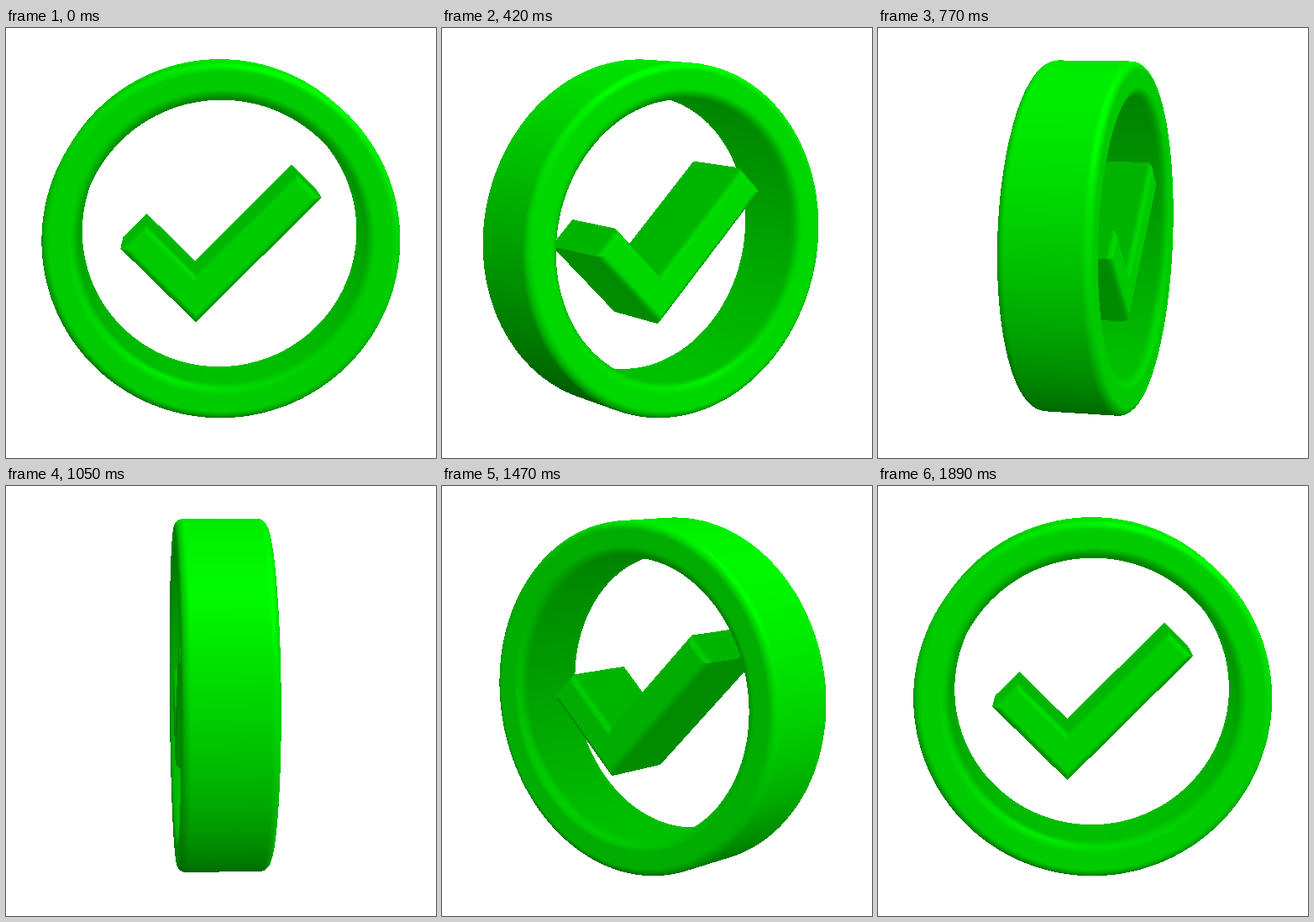
Recreate the animation shown at these times as an HTML page with a canvas. Size 512 by 512 pixels, loop 1960 ms.

```html
<!DOCTYPE html>
<html lang="en">
<head>
<meta charset="utf-8">
<title>Turning check badge</title>
<style>
html, body { margin: 0; width: 100%; height: 100%; overflow: hidden; background: #fff; }
canvas { display: block; width: 512px; height: 512px; }
</style>
</head>
<body>
<canvas id="stage" width="512" height="512"></canvas>
<script>
const SIZE = 512, STEP = 70, POSES = 28;
const CX = 255.3, CY = 249.2, DIST = 2200;
const PITCH = 8.2 * Math.PI / 180;
const ctx = document.getElementById('stage').getContext('2d');
const depth = new Float32Array(SIZE * SIZE);

// Yaw keys: pose, degrees, degrees per pose
const KEYS = [
  [0, 1.3, 0.5], [4, 17, 7.4], [8, 53, 9], [15, 93.5, 3.8],
  [19, 121.8, 9.7], [23, 161, 8.4], [27, 180.8, 0.6], [28, 181.3, 0.5]
];

function yawAt(p) {
  let i = 0;
  while (i < KEYS.length - 2 && p >= KEYS[i + 1][0]) i++;
  const [t0, a, ma] = KEYS[i], [t1, b, mb] = KEYS[i + 1];
  const w = t1 - t0, u = (p - t0) / w, v = 1 - u;
  const deg = a * (1 + 2 * u) * v * v + ma * w * u * v * v
            + b * u * u * (3 - 2 * u) - mb * w * u * u * v;
  // the badge reads the right way round on both half turns
  return (deg > 90 ? deg - 180 : deg) * Math.PI / 180;
}

const verts = [], tris = [];

function vert(pos, normal, inner) {
  verts.push({ pos, normal, inner });
  return verts.length - 1;
}

function quad(a, b, c, d) {
  tris.push([a, b, c], [a, c, d]);
}

function buildRing() {
  const R = 209.3, r = 166.3, half = 54, outB = 10, inB = 13, segs = 160, arc = 7;
  const corners = [[1, 1], [-1, 1], [-1, -1], [1, -1]];
  const profile = [];
  corners.forEach(([out, front], k) => {
    const bevel = out > 0 ? outB : inB;
    const rad = out > 0 ? R - bevel : r + bevel, z = front * (half - bevel);
    for (let i = 0; i <= arc; i++) {
      const f = (k + i / arc) * Math.PI / 2;
      const nr = Math.cos(f), nz = Math.sin(f);
      profile.push([rad + bevel * nr, z + bevel * nz, nr, nz, out < 0]);
    }
  });
  const n = profile.length, base = verts.length;
  for (let s = 0; s < segs; s++) {
    const a = s / segs * Math.PI * 2, c = Math.cos(a), e = Math.sin(a);
    for (const [rad, z, nr, nz, inner] of profile) {
      vert([rad * c, rad * e, z], [nr * c, nr * e, nz], inner);
    }
  }
  for (let s = 0; s < segs; s++) {
    const p = base + s * n, q = base + (s + 1) % segs * n;
    for (let i = 0; i < n; i++) {
      const j = (i + 1) % n;
      quad(p + i, p + j, q + j, q + i);
    }
  }
}

function buildTick() {
  const k = Math.SQRT1_2, half = 53, bevel = 8, arc = 6;
  const short = 123.7, long = 207.5, thick = 41.5;
  // (u along the short arm, v along the long arm) from the lowest point
  const pts = [[0, 0], [0, long], [thick, long], [thick, thick], [short, thick], [short, 0]]
    .map(([u, v]) => [-30 + (v - u) * k, 94 - (u + v) * k]);
  const n = pts.length;
  const edge = pts.map((p, i) => {
    const q = pts[(i + 1) % n], dx = q[0] - p[0], dy = q[1] - p[1], l = Math.hypot(dx, dy);
    return [-dy / l, dx / l];
  });
  const inset = (i, d) => {
    const a = edge[i], b = edge[(i + n - 1) % n];
    return [pts[i][0] - d * (a[0] + b[0]), pts[i][1] - d * (a[1] + b[1])];
  };
  const rows = [];
  for (const side of [-1, 1]) {
    for (let i = 0; i <= arc; i++) {
      const f = (side < 0 ? arc - i : i) / arc * Math.PI / 2;
      rows.push([bevel * (1 - Math.cos(f)), side * (half - bevel * (1 - Math.sin(f))),
        Math.cos(f), side * Math.sin(f)]);
    }
  }
  for (let i = 0; i < n; i++) {
    const j = (i + 1) % n, m = edge[i], base = verts.length;
    for (const [d, z, c, nz] of rows) {
      const normal = [m[0] * c, m[1] * c, nz];
      vert([...inset(i, d), z], normal, true);
      vert([...inset(j, d), z], normal, true);
    }
    for (let q = 0; q < rows.length - 1; q++) {
      const a = base + q * 2;
      quad(a, a + 1, a + 3, a + 2);
    }
  }
  for (const side of [-1, 1]) {
    const base = verts.length;
    for (let i = 0; i < n; i++) vert([...inset(i, bevel), side * half], [0, 0, side], true);
    for (let i = 1; i < n - 1; i++) tris.push([base, base + i, base + i + 1]);
  }
}

function rotator(yaw) {
  const c = Math.cos(yaw), s = Math.sin(yaw), cp = Math.cos(PITCH), sp = Math.sin(PITCH);
  return ([x, y, z]) => {
    const w = z * c - x * s;
    return [x * c + z * s, y * cp + w * sp, w * cp - y * sp];
  };
}

// Light from the upper right; enclosed walls get only a soft ambient part
function shade([x, y, z], axial, inner) {
  const up = -y, open = inner ? axial * axial : 1;
  const lit = 156 + 33 * x + 64 * up + 57 * Math.max(0, z);
  const dim = 162 + 30 * up;
  const shine = Math.max(0, 0.3 * x + 0.5 * up + 0.81 * z);
  return open * (lit + 45 * Math.pow(shine, 40)) + (1 - open) * dim;
}

function fillTri(px, A, B, C) {
  const area = (B.x - A.x) * (C.y - A.y) - (B.y - A.y) * (C.x - A.x);
  if (Math.abs(area) < 1e-6) return;
  const x0 = Math.max(0, Math.ceil(Math.min(A.x, B.x, C.x) - 0.5));
  const x1 = Math.min(SIZE - 1, Math.floor(Math.max(A.x, B.x, C.x) - 0.5));
  const y0 = Math.max(0, Math.ceil(Math.min(A.y, B.y, C.y) - 0.5));
  const y1 = Math.min(SIZE - 1, Math.floor(Math.max(A.y, B.y, C.y) - 0.5));
  for (let y = y0; y <= y1; y++) {
    for (let x = x0; x <= x1; x++) {
      const X = x + 0.5, Y = y + 0.5;
      const b = ((X - A.x) * (C.y - A.y) - (Y - A.y) * (C.x - A.x)) / area;
      const c = ((B.x - A.x) * (Y - A.y) - (B.y - A.y) * (X - A.x)) / area;
      const a = 1 - b - c;
      if (a < -1e-7 || b < -1e-7 || c < -1e-7) continue;
      const z = a * A.z + b * B.z + c * C.z, i = y * SIZE + x;
      if (z <= depth[i]) continue;
      depth[i] = z;
      px[i * 4] = px[i * 4 + 2] = 0;
      px[i * 4 + 1] = a * A.g + b * B.g + c * C.g;
    }
  }
}

function render(pose) {
  const img = ctx.createImageData(SIZE, SIZE);
  img.data.fill(255);
  depth.fill(-1e9);
  const turn = rotator(yawAt(pose));
  const pts = verts.map(({ pos, normal, inner }) => {
    const [x, y, z] = turn(pos), k = DIST / (DIST - z);
    return { x: CX + x * k, y: CY + y * k, z: z * k, g: shade(turn(normal), normal[2], inner) };
  });
  for (const [a, b, c] of tris) fillTri(img.data, pts[a], pts[b], pts[c]);
  return img;
}

buildRing();
buildTick();

const cache = [];
let shown = -1;

function draw(now) {
  const pose = Math.floor(Math.max(0, now) / STEP) % POSES;
  if (pose !== shown) {
    cache[pose] = cache[pose] || render(pose);
    ctx.putImageData(cache[pose], 0, 0);
    shown = pose;
  }
}

const start = performance.now();
function tick() {
  draw(performance.now() - start);
  requestAnimationFrame(tick);
}
tick();
</script>
</body>
</html>
```
